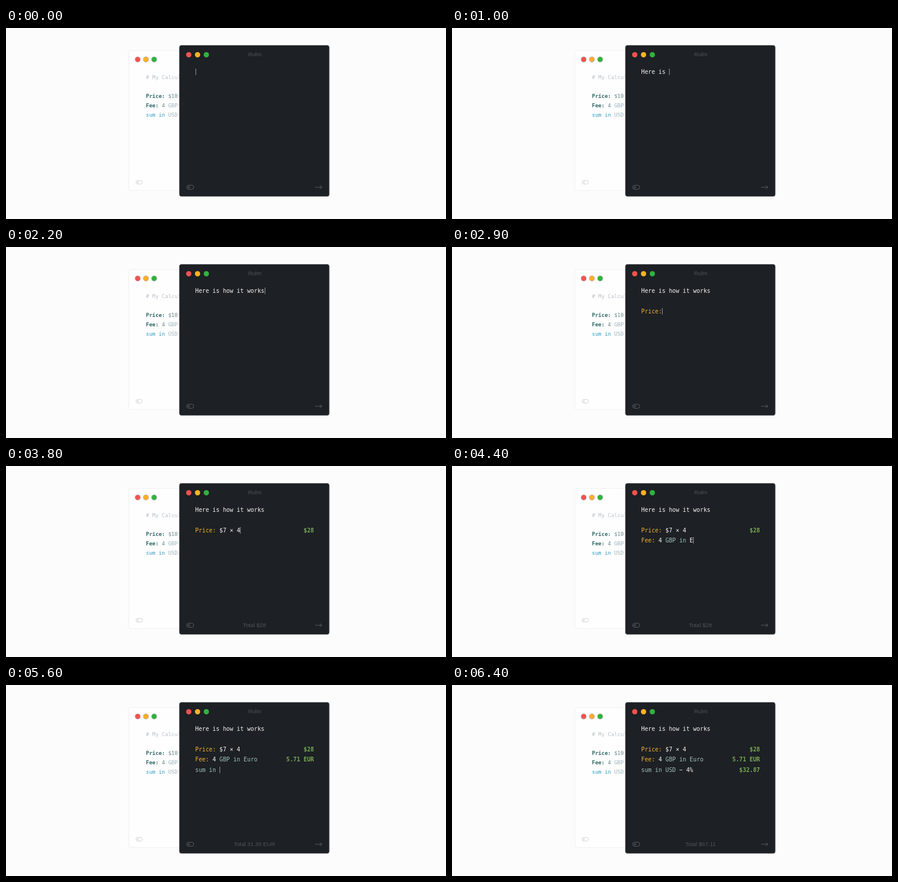
An HTML page for the animation above (6600 ms loop, 750 by 325 pixels).

```html
<!DOCTYPE html>
<html lang="en">
<head>
<meta charset="utf-8">
<title>Calculator demo</title>
<style>
  html, body { margin: 0; width: 100%; height: 100%; overflow: hidden; background: #fcfcfc; }
  svg { display: block; width: 750px; height: 325px; }
  text { white-space: pre; }
  .mono { font-family: "DejaVu Sans Mono", monospace; }
  .code { font-size: 9.8px; fill: #f4f5f5; }
  .result { font-size: 9.8px; font-weight: bold; fill: #76a953; text-anchor: end; }
  .ui { font: 9.7px "Liberation Sans", Arial, sans-serif; fill: #505458; text-anchor: middle; }
  .label { fill: #f3b32f; }
  .word { fill: #9fbfc2; }
  .back { font-size: 9px; }
  .back .name { fill: #2f6865; font-weight: bold; }
  .back .value { fill: #6e8a8b; }
  .back .unit { fill: #9db6bf; }
  .back .key { fill: #2f9cc0; }
  .icon { fill: none; stroke-width: 1; }
</style>
</head>
<body>
<svg viewBox="0 0 750 325">
  <defs>
    <g id="lights">
      <circle r="4.5" fill="#f4524d"/>
      <circle class="mid" r="4.5" fill="#fbb124"/>
      <circle class="end" r="4.5" fill="#2fb33e"/>
    </g>
  </defs>

  <rect x="209.5" y="38.5" width="300" height="238" rx="3" fill="#fefefe" stroke="#f1f1f1"/>
  <g id="backLights" stroke="#a9a3ae" stroke-width=".8"></g>
  <g class="mono back">
    <text x="238.5" y="87" fill="#bcc2c9"># My Calculator</text>
    <text x="238.5" y="119"><tspan class="name">Price:</tspan><tspan class="value"> $10</tspan></text>
    <text x="238.5" y="135"><tspan class="name">Fee:</tspan><tspan class="value"> 4</tspan><tspan class="unit"> GBP</tspan></text>
    <text x="238.5" y="151"><tspan class="key">sum in</tspan><tspan class="unit"> USD</tspan></text>
  </g>
  <g class="icon" stroke="#d3d4d6">
    <rect x="221.5" y="259.5" width="11" height="6" rx="3"/>
    <circle cx="224.7" cy="262.5" r="1.3"/>
  </g>

  <rect x="295.5" y="29.5" width="255.5" height="257" rx="3.5" fill="#1d2024" stroke="#6c6f72" stroke-width=".8"/>
  <g id="frontLights"></g>
  <text class="ui" x="424" y="48">Rulm</text>
  <g class="icon" stroke="#565a5e">
    <rect x="308" y="267.5" width="12" height="7" rx="3.5"/>
    <circle cx="311.7" cy="271" r="1.6"/>
    <path d="M527 271H538.5M535 268l3.5 3l-3.5 3"/>
  </g>
  <text id="total" class="ui" x="423.5" y="273.5"></text>
  <g id="rows" class="mono"></g>
  <rect id="caret" width="1" height="11" fill="#92969a"/>
</svg>
<script>
const LOOP = 6600, LEFT = 323, RIGHT = 525, CHAR = 5.9;
const lines = ["Here is how it works", "Price: $7 × 4", "Fee: 4 GBP in Euro", "sum in USD − 4%"];
const baselines = [78, 112.5, 130, 147.5];

// start time, row, characters shown after each 100 ms
const typing = [
  [0, 0, [0]],
  [200, 0, [1, 2, 3, 4, 5]],
  [800, 0, [6, 7, 8, 10, 12, 15, 17, 20]],
  [2300, 1, [0, 1, 2, 3, 4, 5, 6, 8, 9]],
  [3400, 1, [11, 13]],
  [3900, 2, [1, 3, 6, 8, 12, 15, 16, 17]],
  [4800, 2, [18]],
  [5500, 3, [3, 7, 8, 9, 10, 12]],
  [6200, 3, [15]]
];
const results = [
  [],
  [[3100, "$7"], [3500, "$28"]],
  [[4600, "5.71 EUR"]],
  [[5900, "$34.24"], [6200, "$32.87"]]
];
const totals = [
  [3100, "Total $7"], [3500, "Total $28"], [4600, "Total 31.30 EUR"],
  [5900, "Total $68.48"], [6200, "Total $67.11"]
];
const caretOff = [[1800, 2200], [5100, 5500], [6400, LOOP]];

const $ = id => document.getElementById(id);

function add(parent, tag, attrs) {
  const el = document.createElementNS("http://www.w3.org/2000/svg", tag);
  for (const key in attrs) el.setAttribute(key, attrs[key]);
  return parent.appendChild(el);
}

function lights(id, x, y, gap) {
  ["#f4524d", "#fbb124", "#2fb33e"].forEach((fill, i) =>
    add($(id), "circle", { cx: x + i * gap, cy: y, r: 4.5, fill }));
}

function put(el, html) {
  if (el.shown !== html) el.innerHTML = el.shown = html;
}

const latest = (list, t) => list.reduce((text, [at, next]) => t >= at ? next : text, "");

const highlight = text => text
  .replace(/\b(sum|in|GBP|Euro?|USD)\b/g, '<tspan class="word">$1</tspan>')
  .replace(/^\w+:/, '<tspan class="label">$&</tspan>');

lights("backLights", 224.5, 53.5, 14);
lights("frontLights", 311.5, 45.5, 15);

const rows = baselines.map(y => ({
  code: add($("rows"), "text", { class: "code", x: LEFT - 0.5, y }),
  result: add($("rows"), "text", { class: "result", x: RIGHT, y })
}));

function draw(t) {
  const [start, row, counts] = typing.filter(([at]) => t >= at).pop();
  const count = counts[Math.min(counts.length - 1, Math.floor((t - start) / 100))];
  rows.forEach(({ code, result }, i) => {
    const shown = i < row ? lines[i] : i === row ? lines[i].slice(0, count) : "";
    put(code, highlight(shown));
    put(result, latest(results[i], t));
  });
  put($("total"), latest(totals, t));
  const caret = $("caret");
  caret.setAttribute("x", Math.round(LEFT - 0.5 + count * CHAR));
  caret.setAttribute("y", Math.round(baselines[row] - 9));
  caret.style.opacity = caretOff.some(([from, to]) => t >= from && t < to) ? 0 : 1;
}

const begin = performance.now();
function tick() {
  draw((performance.now() - begin) % LOOP);
  requestAnimationFrame(tick);
}
tick();
</script>
</body>
</html>
```
